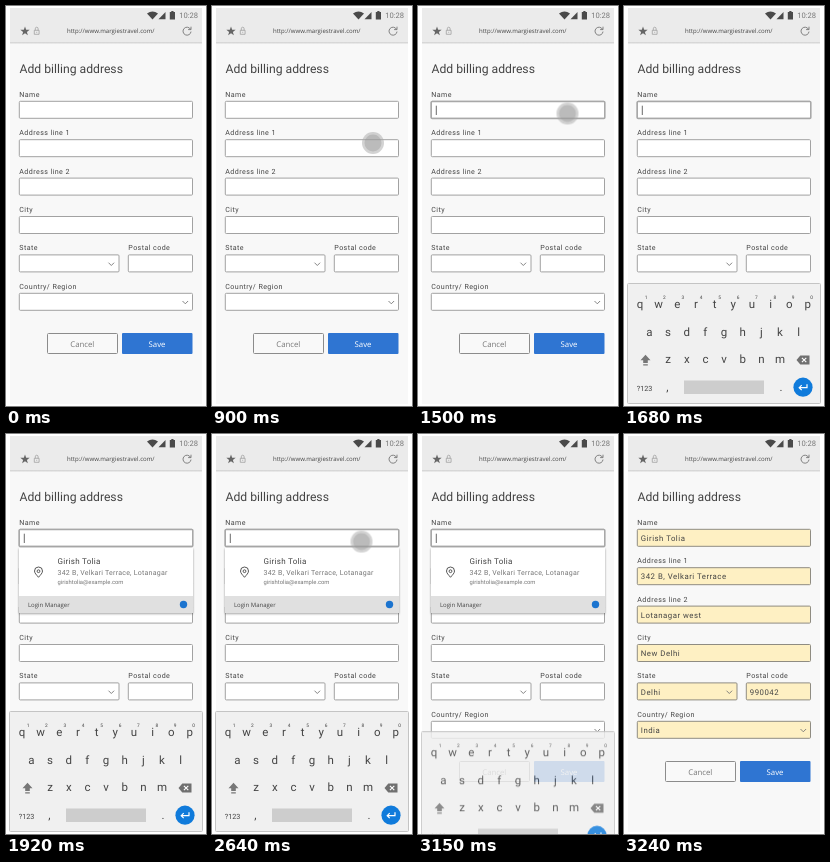
Animation of 200 by 400 pixels, one loop 4.05 s. Source, as an HTML page:

```html
<!DOCTYPE html>
<html lang="en">
<head>
<meta charset="utf-8">
<title>Billing address autofill</title>
<style>
html, body { margin: 0; width: 100%; height: 100%; overflow: hidden; background: #fff; }
svg { display: block; width: 200px; height: 400px; }
text { font-family: Roboto, "Noto Sans", sans-serif; fill: #444; text-rendering: geometricPrecision; }
.sans text, text.sans { font-family: "Open Sans", "Noto Sans", sans-serif; }
.title { font-size: 12.2px; }
.labels text { font-size: 7.1px; letter-spacing: .42px; }
.values text { font-size: 7.8px; letter-spacing: .5px; }
.mid text { text-anchor: middle; }
.line { fill: none; stroke: #777; stroke-width: .9; }
.dark { stroke: #444; }
.thin { stroke: #999; stroke-width: .7; }
.grey, .mid .grey { fill: #777; }
.mid .white { fill: #fff; }

.fields, .values, .focus, .popup, .keys, .touch { animation: 4050ms linear infinite; }
.fields { animation-name: fill; }
.values { animation-name: values; }
.focus { animation-name: focus; }
.popup { animation-name: popup; }
.keys { animation-name: keys; }
.touch { animation-name: touch; }

/* 1% = 40.5 ms */
@keyframes fill {
  0%, 79.98% { fill: #fff; stroke: #a2a2a2; }
  79.99%, 100% { fill: #fef0c3; stroke: #8f8c82; }
}
@keyframes values {
  0%, 79.98% { opacity: 0; }
  79.99%, 100% { opacity: 1; }
}
@keyframes focus {
  0%, 35.53% { opacity: 0; }
  35.54%, 79.98% { opacity: 1; }
  79.99%, 100% { opacity: 0; }
}
@keyframes popup {
  0%, 44.44% { opacity: 0; }
  47.4%, 79.98% { opacity: 1; }
  79.99%, 100% { opacity: 0; }
}
@keyframes keys {
  0%, 37.04% { opacity: 0; transform: translateY(120px); animation-timing-function: ease-out; }
  41.48%, 77.36% { opacity: 1; transform: none; }
  79.99%, 100% { opacity: 0; transform: translateY(120px); }
}
@keyframes touch {
  0%, 22.2% { opacity: 0; transform: translate(161px, 137px); }
  22.21%, 22.96% { opacity: 1; transform: translate(161px, 137px); }
  36.3%, 37.76% { opacity: 1; transform: translate(149.5px, 107.5px); }
  37.77%, 65.17% { opacity: 0; transform: translate(149.5px, 107.5px); }
  65.18% { opacity: 1; transform: translate(149.5px, 107.5px); }
  77.04%, 77.76% { opacity: 1; transform: translate(150px, 138px); }
  77.77%, 100% { opacity: 0; transform: translate(150px, 138px); }
}
</style>
</head>
<body>
<svg viewBox="0 0 200 400">
  <defs>
    <filter id="shadow" x="-10%" y="-20%" width="120%" height="140%">
      <feDropShadow dx="0" dy=".8" stdDeviation="1.2" flood-color="#000" flood-opacity=".4"/>
    </filter>
    <linearGradient id="fade" x2="0" y2="1">
      <stop stop-color="#cfcfcf"/>
      <stop offset="1" stop-color="#f8f8f8"/>
    </linearGradient>
  </defs>

  <!-- browser frame -->
  <rect x="4" y="2" width="192" height="396" fill="#f8f8f8"/>
  <rect x="4" y="2" width="192" height="34" fill="#ebebeb"/>
  <rect x="4" y="36" width="192" height="2.5" fill="url(#fade)"/>
  <g fill="#4a4a4a">
    <path d="M141 7.6Q146.500 3.600 152 7.600L146.500 13.500Z"/>
    <path d="M152.500 13.300H159.500V6Z"/>
    <path d="M163.800 6H165.300V5H167.500V6H169V13.500H163.800Z"/>
    <path id="star" fill="#666"/>
  </g>
  <text x="173.200" y="12" font-size="7.6" class="grey">10:28</text>
  <path class="line thin" d="M28.300 24.300H33.100V28.300H28.300ZM29.300 24.300V22.800A1.400 1.600 0 0 1 32.100 22.800V24.300M30.700 25.800V26.800"/>
  <text class="sans" x="61" y="27.300" font-size="6.050">http://www.margiestravel.com/</text>
  <path class="line" d="M184.600 23.400A4 4 0 1 0 185 25.600M185 20.700V23.600H182.100"/>

  <!-- form -->
  <text class="title" x="13.500" y="67.300">Add billing address</text>
  <g class="labels" id="labels"></g>
  <g class="fields" id="fields"></g>
  <path class="line" d="M102.500 256.700L105.300 259.500L108.100 256.700M176.500 295L179.300 297.800L182.100 295"/>
  <g class="values" id="values"></g>
  <g class="focus">
    <rect x="13.200" y="95.500" width="173.600" height="17" rx="1" fill="none" stroke="#a8a8a8" stroke-width="1.600"/>
    <path d="M18.300 99.700V109" stroke="#444" stroke-width=".8"/>
  </g>
  <g class="sans mid" font-size="7.800">
    <rect x="41.500" y="327.500" width="70" height="20" rx="1" fill="#f9f9f9" stroke="#8c8c8c"/>
    <text x="76.300" y="340.700" class="grey">Cancel</text>
    <rect x="116" y="327" width="70.500" height="21" rx="1" fill="#2f75d2"/>
    <text x="151" y="340.700" class="white">Save</text>
  </g>

  <!-- suggestion -->
  <g class="popup">
    <rect x="13" y="114" width="174" height="65" fill="#fff" filter="url(#shadow)"/>
    <rect x="13" y="162" width="174" height="17" fill="#e0e0e0"/>
    <path class="line dark" d="M32.500 143.300C30.500 140.800 28.500 139.200 28.500 137A4 4 0 0 1 36.500 137C36.500 139.200 34.500 140.800 32.500 143.300Z"/>
    <circle class="line dark" cx="32.500" cy="137.200" r="1.400"/>
    <text x="51.500" y="130.200" font-size="8" letter-spacing=".3">Girish Tolia</text>
    <text x="51.500" y="141" font-size="7" letter-spacing=".25" class="grey">342 B, Velkari Terrace, Lotanagar</text>
    <text x="51.500" y="150.200" font-size="5.850" class="grey">girishtolia@example.com</text>
    <text class="sans" x="22" y="172.700" font-size="6">Login Manager</text>
    <circle cx="177.500" cy="170.500" r="3.700" fill="#1c74cf"/>
  </g>

  <!-- keyboard -->
  <g class="keys">
    <rect x="3.500" y="277.500" width="193" height="120" rx="1" fill="#f0f0f0" stroke="#c4c4c4"/>
    <g class="mid" id="keys"></g>
    <path d="M21.500 348.800L26.500 354.300H23.800V357H19.200V354.300H16.500ZM19.200 358.300H23.800V359.600H19.200Z" fill="#777"/>
    <path d="M172.500 354L176.300 349.600H185.500V358.400H176.300Z" fill="#707070"/>
    <path d="M177.900 351.800L182.300 356.200M182.300 351.800L177.900 356.200" stroke="#fff" stroke-width="1.100"/>
    <rect x="60" y="374.500" width="80" height="13.500" fill="#cdcdcd"/>
    <circle cx="179" cy="381.200" r="9.600" fill="#107bdb"/>
    <path d="M183 378.300V381.700H175.300M177.700 379.200L175.200 381.700L177.700 384.200" fill="none" stroke="#fff" stroke-width="1.200"/>
  </g>

  <g class="touch">
    <circle r="11" fill="#a8a8a8" fill-opacity=".5"/>
    <circle r="8.500" fill="#929292" fill-opacity=".38"/>
  </g>
</svg>
<script>
const add = (id, tag, attrs, text = "") => {
  const el = document.createElementNS("http://www.w3.org/2000/svg", tag);
  for (const key in attrs) el.setAttribute(key, attrs[key]);
  el.textContent = text;
  document.getElementById(id).append(el);
};

// label, value, row, left, width
const form = [
  ["Name", "Girish Tolia", 0, 13.3, 173.2],
  ["Address line 1", "342 B, Velkari Terrace", 1, 13.3, 173.2],
  ["Address line 2", "Lotanagar west", 2, 13.3, 173.2],
  ["City", "New Delhi", 3, 13.3, 173.2],
  ["State", "Delhi", 4, 13.3, 99.7],
  ["Postal code", "990042", 4, 122.3, 64.2],
  ["Country/ Region", "India", 5, 13.3, 173.2]
];
for (const [label, value, row, x, width] of form) {
  const y = row * 38.4;
  add("labels", "text", { x, y: 90.7 + y }, label);
  add("fields", "rect", { x, y: 95.3 + y, width, height: 17, rx: 1 });
  add("values", "text", { x: x + 3.5, y: 107 + y }, value);
}

const key = (text, x, y, size) => add("keys", "text", { x, y, "font-size": size }, text);
const rows = [["qwertyuiop", 16, 302], ["asdfghjkl", 25.4, 329.8], ["zxcvbnm", 44.2, 357.2]];
for (const [letters, x, y] of rows) {
  [...letters].forEach((letter, i) => key(letter, x + i * 18.65, y, 11.5));
}
[..."1234567890"].forEach((digit, i) => key(digit, 22 + i * 18.4, 293, 4.8));
key("?123", 20.5, 384.5, 7.2);
key(",", 43.5, 384.5, 11.5);
key(".", 157, 384.5, 11.5);

const points = Array.from({ length: 10 }, (_, i) => {
  const r = i % 2 ? 2 : 4.9, a = i * Math.PI / 5;
  return [19 + r * Math.sin(a), 25.3 - r * Math.cos(a)];
});
document.getElementById("star").setAttribute("d", "M" + points.join("L") + "Z");
</script>
</body>
</html>
```
